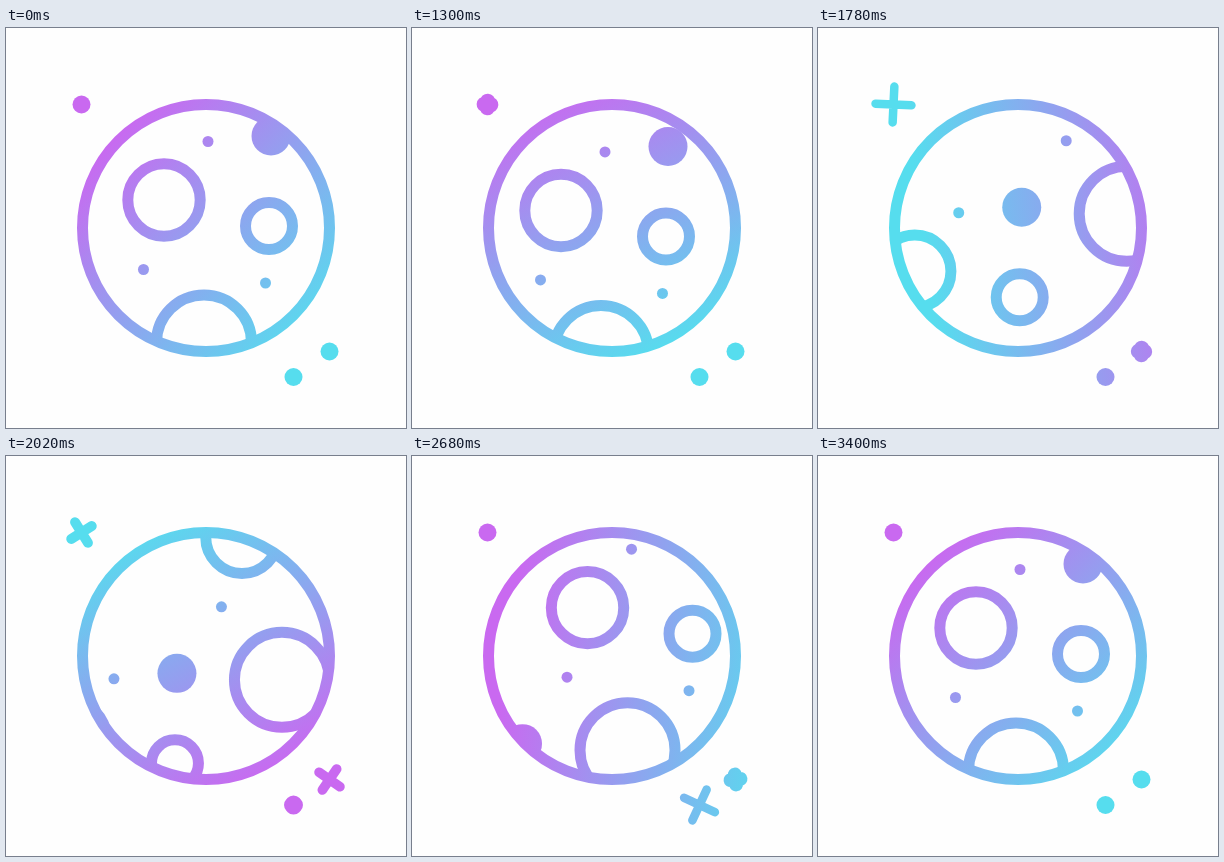
Write an HTML page with a canvas that moves like this. It is 400x400 px and loops after 3.43 s.

```html
<!DOCTYPE html>
<html lang="en">
<head>
<meta charset="utf-8">
<title>Moon</title>
<style>
  html, body { margin: 0; width: 100%; height: 100%; overflow: hidden; background: #fefefe; }
  canvas { display: block; width: 400px; height: 400px; }
</style>
</head>
<body>
<canvas width="400" height="400"></canvas>
<script>
const ctx = document.querySelector('canvas').getContext('2d');
const TAU = Math.PI * 2;
const LOOP = 3430;
const SPIN_START = 1000, SPIN_END = 3400;
const DRIFT = { x: -172, y: 200 };

const rings = [[158, 172, 36.2], [263, 198, 23.5], [198, 314.5, 47.5]];
const spots = [[265, 108, 19.5], [202, 113.5, 5.5], [137.5, 241.5, 5.5], [259.5, 255, 5.5]];
// x, y, time of full size
const stars = [[75.5, 76.5, 1770], [323.5, 323.5, 2260], [287.5, 349, 2580]];

const clamp = (v, lo, hi) => Math.min(hi, Math.max(lo, v));

// cubic-bezier(.333, 0, .4, 1)
function ease(x) {
  let lo = 0, hi = 1;
  for (let i = 0; i < 24; i++) {
    const s = (lo + hi) / 2, r = 1 - s;
    if (s * r * r + 1.2 * s * s * r + s ** 3 < x) lo = s; else hi = s;
  }
  return lo * lo * (3 - 2 * lo);
}

function paint(progress) {
  const angle = Math.PI / 4 + progress * TAU;
  const dx = 141 * Math.cos(angle), dy = 141 * Math.sin(angle);
  const gradient = ctx.createLinearGradient(242 - dx, 172 - dy, 242 + dx, 172 + dy);
  gradient.addColorStop(0, '#c969f0');
  gradient.addColorStop(1, '#56ddee');
  return gradient;
}

function circle(x, y, r, filled) {
  ctx.beginPath();
  ctx.arc(x, y, r, 0, TAU);
  filled ? ctx.fill() : ctx.stroke();
}

function drawCraters(x, y) {
  for (const [cx, cy, r] of rings) circle(cx + x, cy + y, r);
  for (const [cx, cy, r] of spots) circle(cx + x, cy + y, r, true);
}

function drawMoon(progress) {
  ctx.lineWidth = 11;
  ctx.save();
  ctx.beginPath();
  ctx.arc(200, 200, 126, 0, TAU);
  ctx.clip();
  for (const shift of [progress, progress - 1]) drawCraters(shift * DRIFT.x, shift * DRIFT.y);
  ctx.restore();
  circle(200, 200, 123.5);
}

// A dot that opens into a turning plus and closes again
function drawStar(x, y, age) {
  const size = Math.cos(Math.PI / 2 * clamp(age / 650, -1, 1)) ** 2;
  if (size < 0.001) return circle(x, y, 9, true);
  const turn = Math.PI / 2 * (1 + Math.sin(Math.PI * clamp(age / 1130, -0.5, 0.5)));
  const dx = 18 * size * Math.cos(turn), dy = 18 * size * Math.sin(turn);
  ctx.lineWidth = 8.5 + 9.5 * (1 - size) ** 1.7;
  ctx.beginPath();
  ctx.moveTo(x - dx, y - dy);
  ctx.lineTo(x + dx, y + dy);
  ctx.moveTo(x + dy, y - dx);
  ctx.lineTo(x - dy, y + dx);
  ctx.stroke();
}

function draw() {
  const time = performance.now() % LOOP;
  const progress = ease(clamp((time - SPIN_START) / (SPIN_END - SPIN_START), 0, 1));
  ctx.clearRect(0, 0, 400, 400);
  ctx.lineCap = 'round';
  ctx.fillStyle = ctx.strokeStyle = paint(progress);
  drawMoon(progress);
  for (const [x, y, peak] of stars) drawStar(x, y, time - peak);
  requestAnimationFrame(draw);
}
draw();
</script>
</body>
</html>
```
